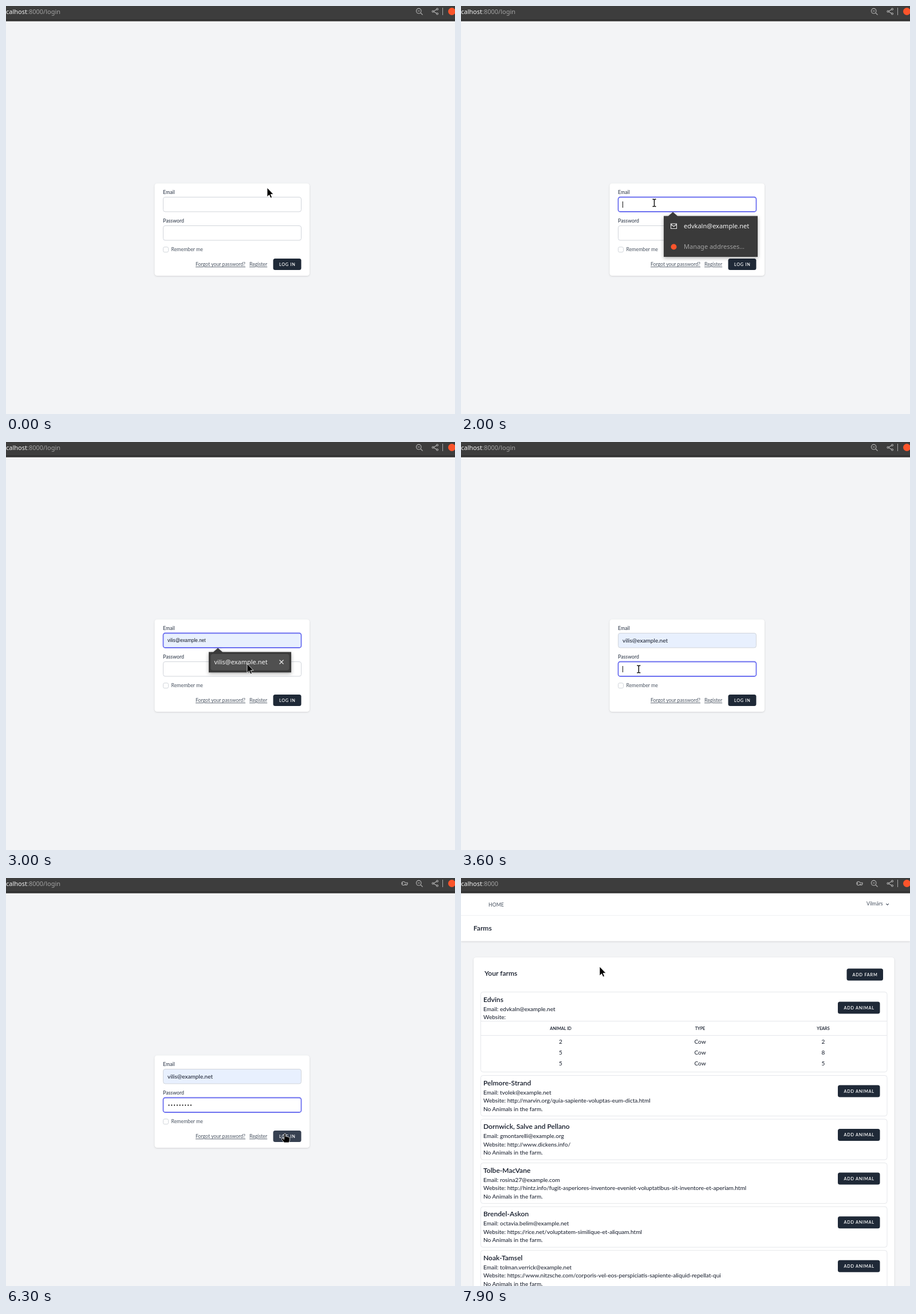
Animation, 784 px wide and 714 px high, one loop 8 s. Source, as an HTML page:

```html
<!DOCTYPE html>
<html lang="en">
<head>
<meta charset="utf-8">
<title>Login</title>
<style>
  html, body { margin: 0; width: 100%; height: 100%; overflow: hidden; background: #f3f4f6; }
  svg { display: block; width: 784px; height: 714px; }
  text { font: 10.1px Lato, sans-serif; fill: #111827; white-space: pre; }
  .small { font-size: 8.75px; }
  .label { font-weight: 500; fill: #374151; }
  .muted { fill: #4b5563; }
  .link { text-decoration: underline; }
  .head { font-size: 12.1px; font-weight: 600; }
  .th { font-size: 7.3px; font-weight: 600; text-anchor: middle; }
  .mid { text-anchor: middle; }
  .btn { font-size: 7.3px; font-weight: 600; letter-spacing: .73px; fill: #fff; text-anchor: middle; }
  .ui { font: 11px "Noto Sans", sans-serif; fill: #f4f4f4; }
  .medium { font-weight: 500; }
  .dim { fill: #a2a2a2; }
  .preview { font: 8.2px "Liberation Sans", sans-serif; }
  .icon { fill: none; stroke: #b4b4b4; stroke-width: 1.1; }
  .shadow { filter: drop-shadow(0 1.5px 1.8px #0002); }
  .pop { filter: drop-shadow(0 2px 3px #0005); }
</style>
</head>
<body>
<svg id="stage" viewBox="0 0 784 714"></svg>
<script>
const EMAIL = 'vilis@example.net', OTHER = 'edvkaln@example.net';
const INK = '#1f2937', HOVER = '#374151', PRESSED = '#111827', BRAND = '#fb542b';

const text = (x, y, str, cls = '', extra = '') => `<text x="${x}" y="${y}" class="${cls}" ${extra}>${str}</text>`;
const rect = (x, y, w, h, fill, r = 0, extra = '') =>
  `<rect x="${x}" y="${y}" width="${w}" height="${h}" rx="${r}" fill="${fill}" ${extra}/>`;
const line = (d, extra = '') => `<path d="${d}" class="icon" ${extra}/>`;
const group = (id, body, cls = '') => `<g id="${id}" class="${cls}">${body}</g>`;
const button = (x, y, w, h, str) =>
  rect(x, y, w, h, INK, 3.5) + text(x + w / 2 + .3, y + h / 2 + 2.6, str, 'btn');

const toolbar = () =>
  rect(0, 0, 784, 26.5, '#3d3d3d') + rect(0, 23, 784, 3.5, '#333') +
  text(0, 13.5, 'calhost<tspan class="dim" id="path"></tspan>', 'ui') +
  group('key', line('M697 8.3A3.2 3.2 0 1 0 697 10.7H697.6V12.3H700V10.7H701V8.3Z') +
    '<circle cx="692.3" cy="9.5" r="1" fill="#b4b4b4"/>') +
  '<circle cx="720.7" cy="8.7" r="4.3" class="icon"/>' + line('M718.6 8.7H722.8M723.8 11.8L727.5 15.5') +
  line('M752.5 5.8L746 9.5L752.5 13.2') +
  [[745.5, 9.5], [753, 5.5], [753, 13.5]].map(([x, y]) =>
    `<circle cx="${x}" cy="${y}" r="1.5" class="icon" style="fill:#3d3d3d"/>`).join('') +
  rect(762, 3, 1, 13, '#aaa') + `<circle cx="778.5" cy="9.5" r="6.5" fill="${BRAND}"/>`;

const field = (id, y) => rect(274.5, y, 241, 25.5, '#fff', 3.5, `id="${id}" stroke="#d1d5db"`);

const popup = (id, width, rows, body) => group(id,
  `<path class="pop" fill="#3a3a3a" d="M354 367.5H362L370 360.5L378 367.5H${354 + width}V${367.5 + rows * 35.8}H354Z"/>` + body);

const login = () =>
  rect(259.5, 310.5, 270.5, 161.5, '#fff', 4.5, 'class="shadow"') +
  text(274, 328.8, 'Email', 'small label') + field('email', 334.5) +
  text(282, 350.8, '', '', 'id="typed"') + text(282, 350.3, EMAIL, 'preview', 'id="preview"') +
  text(274, 378.9, 'Password', 'small label') + field('password', 384.5) +
  group('dots', Array.from({ length: 9 }, (_, i) =>
    `<circle cx="${284.5 + i * 4.8}" cy="397.6" r="1.05"/>`).join('')) +
  rect(282, 342, 1, 11, '#111', 0, 'id="caret"') +
  rect(274.5, 421.8, 9, 9, '#fff', 2.4, 'stroke="#d1d5db"') +
  text(288.5, 429, 'Remember me', 'small muted') +
  text(331, 455.3, 'Forgot your password?', 'small muted link') +
  text(425, 455.3, 'Register', 'small muted link') +
  rect(464.8, 440.3, 52.5, 23.5, 'none', 5, 'id="ring" stroke="#6366f1" stroke-width="1.3"') +
  group('submit', button(466.5, 442, 49, 20, 'LOG IN')) +
  popup('saved', 164, 2,
    line('M366.5 381H376.5V389.5H366.5ZM366.5 382L371.5 385.8L376.5 382', 'style="stroke:#e8e8e8"') +
    text(389, 389, OTHER, 'ui medium') +
    `<circle cx="371.5" cy="421.5" r="5" fill="${BRAND}"/>` + text(389, 425.2, 'Manage addresses…', 'ui dim')) +
  popup('matches', 183, 4, [EMAIL, 'valda@example.org', 'vaira@example.com', 'visma@example.net'].map((m, i) =>
    text(363.5, 389 + i * 35.8, m, 'ui')).join('')) +
  popup('match', 144, 1, rect(357.5, 371, 137, 28.5, '#505050', 4, 'id="hover"') +
    text(363.5, 389, EMAIL, 'ui') + line('M477.5 381.5L484.5 388.5M484.5 381.5L477.5 388.5', 'style="stroke:#eee"'));

const farms = [
  ['Pelmore-Strand', 'tvolek@example.net', 'http://marvin.org/quia-sapiente-voluptas-eum-dicta.html'],
  ['Dornwick, Salve and Pellano', 'gmontarelli@example.org', 'http://www.dickens.info/'],
  ['Tolbe-MacVane', 'rosina27@example.com', 'http://hintz.info/fugit-asperiores-inventore-eveniet-voluptatibus-sit-inventore-et-aperiam.html'],
  ['Brendel-Askon', 'octavia.belim@example.net', 'https://rice.net/voluptatem-similique-et-aliquam.html'],
  ['Noak-Tamsel', 'tolman.verrick@example.net', 'https://www.nitzsche.com/corporis-vel-eos-perspiciatis-sapiente-aliquid-repellat-qui']
];
const farmCard = (y, height, [name, email, site]) =>
  rect(34.5, y, 709.5, height, '#fff', 4, 'stroke="#e5e7eb"') +
  text(39, y + 17.3, name, 'head') + text(39, y + 33, 'Email: ' + email) +
  text(39, y + 47.5, 'Website: ' + site) + button(658, y + 17, 73.5, 21, 'ADD ANIMAL');
const columns = (y, cells, cls) => cells.map((c, i) => text([174, 417.5, 632.5][i], y, c, cls)).join('');

const home = () =>
  rect(0, 26, 784, 84.5, '#fff', 0, 'class="shadow"') + rect(0, 65, 784, 1, '#f0f1f3') +
  text(48, 49.8, 'HOME', 'small muted') + text(708, 48.4, 'Vilmārs', 'small muted') +
  line('M742.3 44.8L744.6 47.1L746.9 44.8', 'style="stroke:#4b5563"') +
  text(21.8, 92, 'Farms', 'head') + rect(22, 139, 734.5, 600, '#fff', 4.5, 'class="shadow"') +
  text(41, 171, 'Your farms', 'head') + button(673.5, 158.5, 63.5, 21, 'ADD FARM') +
  farmCard(199.5, 140, ['Edvīns', OTHER, '']) +
  rect(35, 250, 709, 1, '#e5e7eb') + rect(35, 275, 709, 1, '#e5e7eb') +
  columns(265.8, ['ANIMAL ID', 'TYPE', 'YEARS'], 'th') +
  [[2, 2], [5, 8], [5, 5]].map(([id, years], i) => columns(289.6 + i * 19.3, [id, 'Cow', years], 'mid')).join('') +
  farms.map((farm, i) => {
    const y = 345.5 + i * 76.55;
    return farmCard(y, 71, farm) + text(39, y + 62, 'No Animals in the farm.');
  }).join('');

const pointers = () => group('pointer',
  group('arrow', '<path d="M0 0V16L3.6 12.6L6 18L8.5 17L6.2 11.6H11Z" stroke="#fff" stroke-width=".8"/>') +
  group('beam', '<path d="M-3 -6.2H-1L0 -5.4L1 -6.2H3M-3 6.2H-1L0 5.4L1 6.2H3M0 -5.4V5.4" fill="none" stroke="#fff" stroke-width="2.6"/>' +
    '<path d="M-3 -6.2H-1L0 -5.4L1 -6.2H3M-3 6.2H-1L0 5.4L1 6.2H3M0 -5.4V5.4" fill="none" stroke="#111" stroke-width="1.5"/>') +
  group('hand', '<path d="M-2 0Q-.5 -2 1 0V4.5Q2.5 3.6 3.5 5Q5 4.2 6 5.7Q8 5.3 8 7.5V11L6.5 15H-2L-6 9.5Q-6.5 7 -4.5 7.5L-2 9.5Z" stroke="#fff" stroke-width=".8"/>'));

const $ = id => document.getElementById(id);
$('stage').innerHTML = group('login', login()) + group('home', home()) + toolbar() + pointers();

// Mouse path: time, x, y
const track = [[0, 456, 318], [100, 456, 318], [600, 337.5, 344.5], [2200, 337.5, 344.5], [2400, 430, 416],
  [2800, 430, 416], [3000, 421, 388], [3300, 421, 388], [3600, 310.3, 397.5], [5600, 310.3, 397.5],
  [6000, 526, 440], [6300, 487.5, 448], [7300, 487.5, 448], [7700, 206, 190], [7900, 242, 155]];
const dotTimes = [4200, 4300, 4400, 4600, 4800, 5000, 5400, 5400, 5600];

function mouseAt(t) {
  const i = Math.max(1, track.findIndex(k => k[0] >= t));
  const [t0, x0, y0] = track[i - 1], [t1, x1, y1] = track[i];
  const p = (t - t0) / (t1 - t0), e = p * p * (3 - 2 * p);
  return [x0 + (x1 - x0) * e, y0 + (y1 - y0) * e];
}

const show = (id, on) => $(id).style.display = on ? '' : 'none';
const set = (el, attrs) => Object.entries(attrs).forEach(([k, v]) => el.setAttribute(k, v));
const focus = (id, on) => set($(id), { stroke: on ? '#6b6ff0' : '#d1d5db', 'stroke-width': on ? 1.8 : 1 });

function draw(t) {
  const within = (a, b) => t >= a && t < b;
  const [x, y] = mouseAt(t);
  const inside = (l, top, r, b) => x >= l && x <= r && y >= top && y <= b;
  const onLogin = t < 7100, menu = within(2400, 3300);
  const disabled = t >= 6700;

  show('login', onLogin);
  show('home', !onLogin);
  show('key', t >= 4200);
  $('path').textContent = onLogin ? ':8000/login' : ':8000';

  const inEmail = within(800, 3600), inPassword = within(3600, 6500);
  const preview = within(2900, 3300);
  focus('email', inEmail);
  focus('password', inPassword);
  $('email').setAttribute('fill', t >= 2900 ? '#e8f0fe' : '#fff');
  const typed = t >= 3300 ? EMAIL : EMAIL.slice(0, t >= 2400 ? 3 : t >= 2200 ? 2 : t >= 2100 ? 1 : 0);
  $('typed').textContent = typed;
  show('typed', !preview);
  show('preview', preview);

  const dots = dotTimes.filter(d => t >= d).length;
  [...$('dots').children].forEach((dot, i) => dot.style.display = i < dots ? '' : 'none');
  show('caret', (inEmail && !within(1400, 2000) && !preview) || (inPassword && t < 6100));
  const typedWidth = onLogin && typed ? $('typed').getComputedTextLength() : 0;
  set($('caret'), inPassword ? { x: 282 + dots * 4.75, y: 392 } : { x: 282 + typedWidth, y: 342 });

  show('saved', within(800, 2100));
  show('matches', within(2100, 2200));
  show('match', menu);
  show('hover', preview);

  const onButton = onLogin && inside(466, 442, 516, 462);
  const pressed = within(6500, 6600);
  $('submit').firstChild.setAttribute('fill', pressed ? PRESSED : onButton ? HOVER : INK);
  $('submit').style.opacity = disabled ? 1 - .75 * Math.min(1, (t - 6600) / 200) : 1;
  show('ring', within(6500, 6700));

  const overField = onLogin && !menu && (inside(274, 334, 516, 360) || inside(274, 384, 516, 410));
  const hand = onButton && !disabled;
  show('beam', overField);
  show('hand', hand);
  show('arrow', !overField && !hand);
  $('pointer').setAttribute('transform', `translate(${x} ${y})`);
}

function frame() {
  draw(Math.floor(performance.now() % 8000 / 100) * 100);
  requestAnimationFrame(frame);
}
frame();
</script>
</body>
</html>
```
